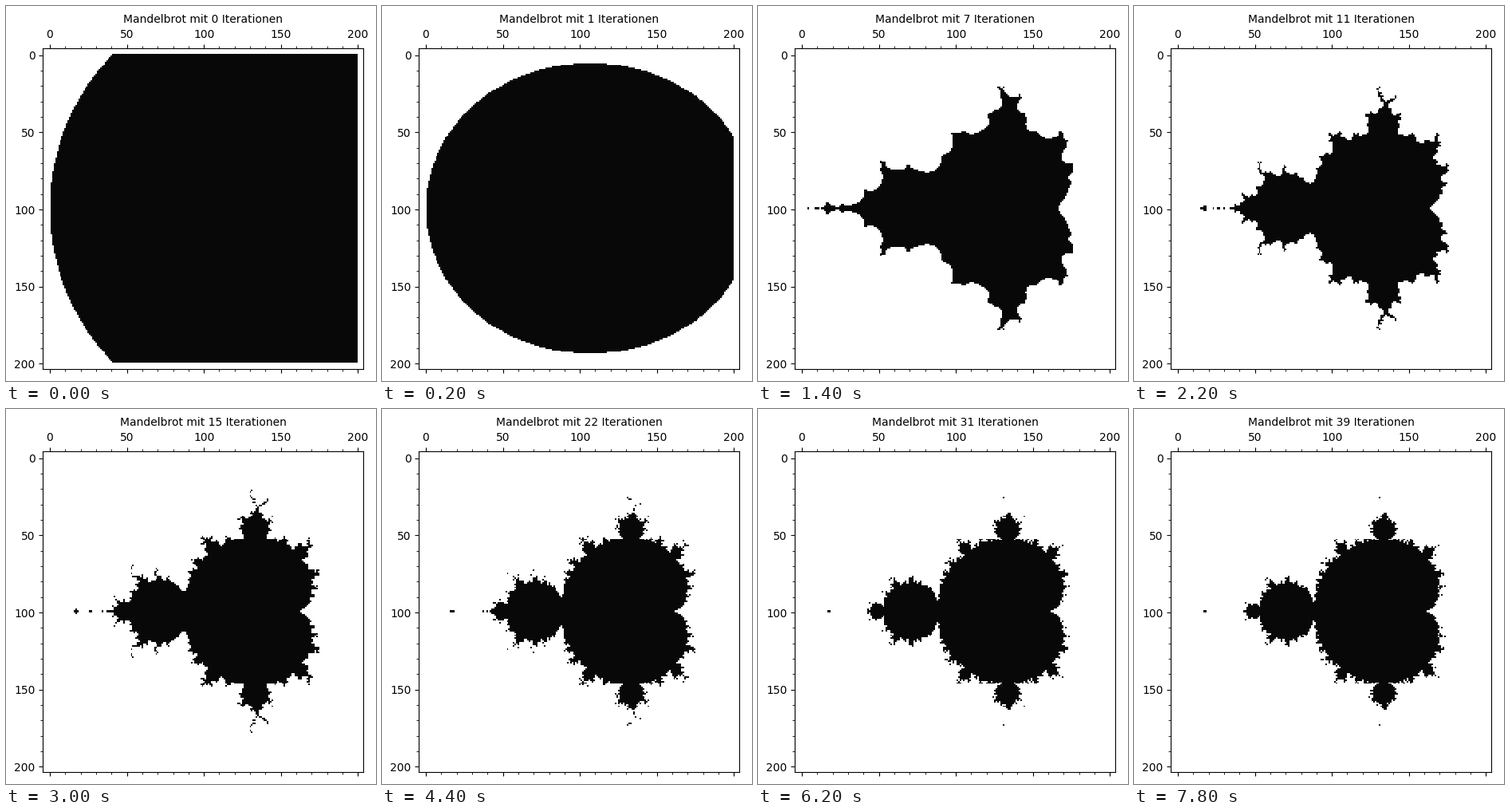
Recreate the animation shown at these times as a matplotlib script. Size 464x470 px, loop 8 s.

```python
import numpy as np
import matplotlib.pyplot as plt
from matplotlib.animation import FuncAnimation
from matplotlib.colors import ListedColormap
from matplotlib.ticker import MultipleLocator

W, H, DPI = 464, 470, 100
EPS = 1e-3             # keeps the pixel size from rounding down
N = 200                # grid cells per side
STEPS = 40             # one more iteration per step
LEFT, BOTTOM, SIDE = 46.2, 14.9, 402


def mandelbrot_masks(steps):
    """Points still within radius 2 after 0, 1, 2, ... iterations."""
    x = np.linspace(-2, 0.8, N)
    y = np.linspace(-1.4, 1.4, N)
    c = x[None, :] + 1j * y[:, None]
    z = c.copy()
    inside = np.abs(z) <= 2
    masks = [inside.copy()]
    for _ in range(steps - 1):
        z[inside] = z[inside] ** 2 + c[inside]
        inside &= np.abs(z) <= 2
        masks.append(inside.copy())
    return masks


masks = mandelbrot_masks(STEPS)

plt.rcParams["font.family"] = "DejaVu Sans"
fig = plt.figure(figsize=((W + EPS) / DPI, (H + EPS) / DPI), dpi=DPI,
                 facecolor="white")
ax = fig.add_axes([LEFT / W, BOTTOM / H, SIDE / W, SIDE / H])

image = ax.imshow(masks[0].astype(float), cmap=ListedColormap(["white", "#080808"]),
                  vmin=0, vmax=1, interpolation="nearest", aspect="auto")
ax.set_xlim(-4.5, N + 3.5)
ax.set_ylim(N + 3.5, -4.5)

for axis in (ax.xaxis, ax.yaxis):
    axis.set_major_locator(MultipleLocator(50))
    axis.set_minor_locator(MultipleLocator(10))
ax.tick_params(axis="x", which="both", top=True, bottom=True,
               labeltop=True, labelbottom=False)
ax.tick_params(labelsize=10)
title = ax.set_title("", fontsize=10)


def draw(i):
    image.set_data(masks[i].astype(float))
    title.set_text(f"Mandelbrot mit {i} Iterationen")
    return image, title


anim = FuncAnimation(fig, draw, frames=STEPS, interval=200,
                     init_func=lambda: draw(0), repeat=True, repeat_delay=0)
plt.show()
```
